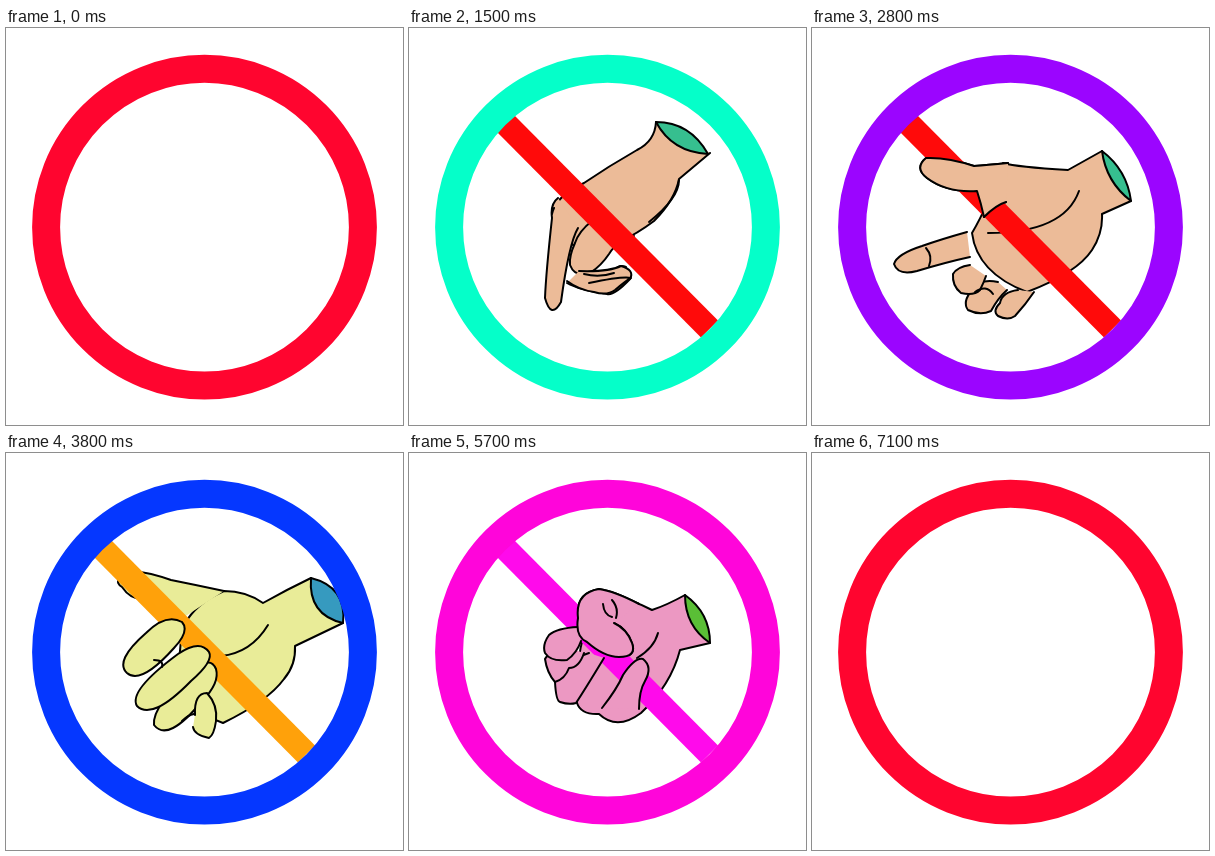
Write an HTML page without scripts that moves like this. It is 397 px wide and 397 px high and loops after 7.3 s.

```html
<!DOCTYPE html>
<html lang="en">
<head>
<meta charset="utf-8">
<title>Hand takes the bar</title>
<style>
@property --ring { syntax: "<number>"; inherits: true; initial-value: 350; }
@property --hue { syntax: "<number>"; inherits: true; initial-value: 0; }

html, body { margin: 0; width: 100%; height: 100%; overflow: hidden; background: #fff; }
svg { display: block; width: 100%; height: 100%; animation: ring 7300ms infinite, hue 7300ms infinite; }
path { fill: none; stroke: #000; stroke-width: 2; stroke-linecap: round; stroke-linejoin: round; animation: 7300ms infinite; }
g { animation: 7300ms infinite; }

.skin { fill: hsl(calc(25 + var(--hue)) 69% 76%); }
.cuff { fill: hsl(calc(159 + var(--hue)) 56% 48%); animation-name: cuff; }
.ring { fill: none; stroke: hsl(var(--ring) 100% 51%); stroke-width: 28; }
.bar { stroke: hsl(var(--hue) 100% 52%); stroke-width: 24; stroke-linecap: butt; stroke-dasharray: 290; animation-name: bar; }
.palm { animation-name: palm; }
.thumb { animation-name: thumb; }
.over { animation-name: thumb, over; }
.index { animation-name: index; }
.middle { animation-name: middle; }
.third { animation-name: third; }
.pinky { animation-name: pinky; }
.crease { animation-name: crease; }
.joints { animation-name: joints; }
.enter { animation-name: enter; }
.pull { animation-name: pull; }

/* colours */
@keyframes ring {
  0% { --ring: 350; }
  5.479% { --ring: 350; animation-timing-function: steps(11); }
  20.547% { --ring: 167; animation-timing-function: steps(13); }
  38.356% { --ring: -84; animation-timing-function: steps(10); }
  52.054% { --ring: -132; animation-timing-function: steps(9); }
  64.383% { --ring: -325; animation-timing-function: steps(10); }
  78.082% { --ring: -411; animation-timing-function: steps(14); }
  97.26%, 100% { --ring: -730; }
}
@keyframes hue {
  0% { --hue: 0; }
  38.356% { --hue: 0; animation-timing-function: steps(10); }
  52.054% { --hue: 37; animation-timing-function: steps(9); }
  64.383% { --hue: 60; animation-timing-function: steps(10); }
  78.082% { --hue: 305; animation-timing-function: steps(8); }
  89.041%, 100% { --hue: 360; }
}

/* travel */
@keyframes bar {
  0% { stroke-dashoffset: 290; }
  5.479% { stroke-dashoffset: 290; animation-timing-function: steps(5); }
  12.328%, 100% { stroke-dashoffset: 0; }
}
@keyframes enter {
  0% { transform: translate(200px, -200px); }
  8.219% { transform: translate(200px, -200px); animation-timing-function: steps(9); }
  20.547%, 100% { transform: none; }
}
@keyframes pull {
  0% { transform: none; }
  83.561% { transform: none; animation-timing-function: steps(10); }
  97.26%, 100% { transform: translate(157px, -147px); }
}
@keyframes over {
  0% { opacity: 0; animation-timing-function: step-end; }
  31.506% { opacity: 1; animation-timing-function: step-end; }
  43.835% { opacity: 0; animation-timing-function: step-end; }
  58.904%, 100% { opacity: 1; }
}

/* poses: limp, open, closing, grip, fist */
@keyframes palm {
  0% { d: path("M247 94Q246 113 228 122Q200 138 175 155Q148 168 145 182Q152 212 175 225Q212 218 245 193Q266 172 270 151L301 125"); }
  20.547% { d: path("M247 94Q246 113 228 122Q200 138 175 155Q148 168 145 182Q152 212 175 225Q212 218 245 193Q266 172 270 151L301 125"); animation-timing-function: steps(13); }
  38.356% { d: path("M290 123Q272 133 256 142Q205 139 191 135Q176 178 160 205Q165 245 215 264Q265 245 280 222Q291 205 290 186L319 173"); animation-timing-function: steps(10); }
  52.054% { d: path("M305 125Q280 137 257 150Q240 138 218 138Q190 150 178 172Q160 250 217 270Q262 248 278 226Q290 212 289 193L337 170"); animation-timing-function: steps(9); }
  64.383% { d: path("M278 127Q258 138 244 149Q222 140 205 141Q188 160 186 190Q180 285 214 278Q258 250 272 228Q284 206 284 186L311 172"); animation-timing-function: steps(10); }
  78.082%, 100% { d: path("M276 142Q258 152 243 157Q222 146 195 140Q165 180 168 250Q172 262 190 261Q208 278 232 260Q262 232 271 197L301 190"); }
}
@keyframes cuff {
  0% { d: path("M247 94Q281 94 299 126Q263 124 247 94Z"); }
  20.547% { d: path("M247 94Q281 94 299 126Q263 124 247 94Z"); animation-timing-function: steps(13); }
  38.356% { d: path("M290 123Q315 142 319 173Q294 154 290 123Z"); animation-timing-function: steps(10); }
  52.054% { d: path("M305 125Q341 134 337 170Q302 162 305 125Z"); animation-timing-function: steps(9); }
  64.383% { d: path("M278 127Q309 139 311 172Q280 160 278 127Z"); animation-timing-function: steps(10); }
  78.082%, 100% { d: path("M276 142Q301 160 301 190Q276 173 276 142Z"); }
}
@keyframes thumb {
  0% { d: path("M183 193Q170 203 166 215Q160 228 161 237Q166 250 181 245Q192 238 200 226Q205 218 212 213Q218 210 225 208"); }
  20.547% { d: path("M183 193Q170 203 166 215Q160 228 161 237Q166 250 181 245Q192 238 200 226Q205 218 212 213Q218 210 225 208"); animation-timing-function: steps(13); }
  38.356% { d: path("M196 135Q175 137 162 138Q135 129 114 130Q102 140 115 150Q135 165 165 163Q169 175 172 189Q184 177 194 174"); animation-timing-function: steps(10); }
  52.054% { d: path("M218 138Q190 132 165 127Q140 118 128 119Q104 126 116 134Q124 146 136 146Q150 150 160 160Q168 165 172 168"); animation-timing-function: steps(9); }
  64.383% { d: path("M244 149Q225 141 208 141Q193 146 191 172Q180 188 186 200Q188 232 206 233Q222 230 218 205Q212 190 216 185"); animation-timing-function: steps(10); }
  78.082%, 100% { d: path("M230 151Q205 138 190 136Q166 140 169 165Q166 184 178 189Q195 204 210 204Q228 204 223 190Q218 176 205 170"); }
}
@keyframes index {
  0% { d: path("M149 170Q141 176 143 190Q137 245 136 270Q142 292 152 274Q160 215 169 200"); }
  20.547% { d: path("M149 170Q141 176 143 190Q137 245 136 270Q142 292 152 274Q160 215 169 200"); animation-timing-function: steps(13); }
  38.356% { d: path("M155 204Q130 211 110 218Q85 226 82 236Q86 248 105 243Q135 234 158 229"); animation-timing-function: steps(10); }
  52.054% { d: path("M168 195Q184 178 176 169Q160 160 140 180Q108 208 121 220Q135 232 168 195"); animation-timing-function: steps(9); }
  64.383% { d: path("M158 206Q176 190 170 180Q158 172 138 192Q104 220 118 234Q130 240 158 206"); animation-timing-function: steps(10); }
  78.082%, 100% { d: path("M169 174Q148 175 140 182Q133 192 136 200Q142 209 158 207Q168 200 172 188"); }
}
@keyframes middle {
  0% { d: path("M170 243Q200 244 212 238Q226 242 221 251Q205 268 198 266Q170 262 158 255"); }
  20.547% { d: path("M170 243Q200 244 212 238Q226 242 221 251Q205 268 198 266Q170 262 158 255"); animation-timing-function: steps(13); }
  38.356% { d: path("M158 237Q145 239 141 246Q140 258 149 265Q162 268 168 262Q172 254 174 248"); animation-timing-function: steps(10); }
  52.054% { d: path("M185 228Q208 208 203 199Q194 186 172 201Q122 238 131 253Q146 268 185 228"); animation-timing-function: steps(9); }
  64.383% { d: path("M172 228Q190 214 185 205Q172 200 152 218Q128 236 133 250Q146 268 172 228"); animation-timing-function: steps(10); }
  78.082%, 100% { d: path("M160 195Q140 198 136 206Q138 220 146 229Q156 226 160 215Q170 215 175 200"); }
}
@keyframes third {
  0% { d: path("M205 243Q210 236 217 239Q215 246 205 245Q195 250 188 246Q180 245 175 246"); }
  20.547% { d: path("M205 243Q210 236 217 239Q215 246 205 245Q195 250 188 246Q180 245 175 246"); animation-timing-function: steps(13); }
  38.356% { d: path("M186 254Q168 250 160 262Q150 274 156 282Q168 288 179 283Q186 270 195 262"); animation-timing-function: steps(10); }
  52.054% { d: path("M196 248Q214 230 210 216Q204 202 188 218Q146 252 148 272Q162 290 196 248"); animation-timing-function: steps(9); }
  64.383% { d: path("M186 250Q202 236 196 230Q184 226 168 245Q146 258 150 269Q168 284 186 250"); animation-timing-function: steps(10); }
  78.082%, 100% { d: path("M180 200Q150 210 146 229Q147 248 151 249Q160 252 167 250Q175 238 195 205"); }
}
@keyframes pinky {
  0% { d: path("M158 253Q170 262 185 264Q198 268 206 262Q218 252 222 250Q214 248 180 255"); }
  20.547% { d: path("M158 253Q170 262 185 264Q198 268 206 262Q218 252 222 250Q214 248 180 255"); animation-timing-function: steps(13); }
  38.356% { d: path("M206 262Q190 264 188 275Q180 283 186 288Q196 293 203 288Q214 276 222 264"); animation-timing-function: steps(10); }
  52.054% { d: path("M189 262Q188 240 201 240Q212 252 210 268Q208 282 203 285Q188 282 187 274"); animation-timing-function: steps(9); }
  64.383% { d: path("M188 274Q187 255 196 240Q212 222 219 228Q222 242 214 256Q212 268 214 278"); animation-timing-function: steps(10); }
  78.082%, 100% { d: path("M193 255Q208 236 214 222Q226 204 234 206Q244 214 236 228Q230 238 230 256"); }
}
@keyframes crease {
  0% { d: path("M270 152Q270 170 240 194"); }
  20.547% { d: path("M270 152Q270 170 240 194"); animation-timing-function: steps(13); }
  38.356% { d: path("M267 163Q252 205 176 205"); animation-timing-function: steps(10); }
  52.054% { d: path("M262 172Q245 200 215 203"); animation-timing-function: steps(9); }
  64.383% { d: path("M264 165Q262 195 222 203"); animation-timing-function: steps(10); }
  78.082%, 100% { d: path("M249 180Q245 195 228 205"); }
}
@keyframes joints {
  0% { d: path("M145 180Q144 182 143 186M175 246Q190 250 205 245"); }
  20.547% { d: path("M145 180Q144 182 143 186M175 246Q190 250 205 245"); animation-timing-function: steps(13); }
  38.356% { d: path("M114 220Q121 228 117 238M163 264Q174 256 181 266"); animation-timing-function: steps(10); }
  52.054% { d: path("M148 207Q158 207 156 214M176 268Q182 262 188 261"); animation-timing-function: steps(9); }
  64.383% { d: path("M141 195Q144 208 157 209M234 157Q237 176 217 184"); animation-timing-function: steps(10); }
  78.082%, 100% { d: path("M203 147Q210 155 207 165M194 151Q195 162 203 164"); }
}
</style>
</head>
<body>
<svg viewBox="0 0 397 397">
  <clipPath id="hole"><circle cx="198.5" cy="199.2" r="158"/></clipPath>
  <g clip-path="url(#hole)">
    <g class="pull">
      <g class="enter">
        <path class="skin palm"/>
        <path class="cuff"/>
        <path class="skin thumb"/>
        <path class="crease"/>
      </g>
      <path class="bar" d="M96.5 95.5L300.5 301"/>
      <g class="enter">
        <path class="skin third"/>
        <path class="skin middle"/>
        <path class="skin index"/>
        <path class="skin pinky"/>
        <path class="skin thumb over"/>
        <path class="joints"/>
      </g>
    </g>
  </g>
  <circle class="ring" cx="198.5" cy="199.2" r="158.4"/>
</svg>
</body>
</html>
```
